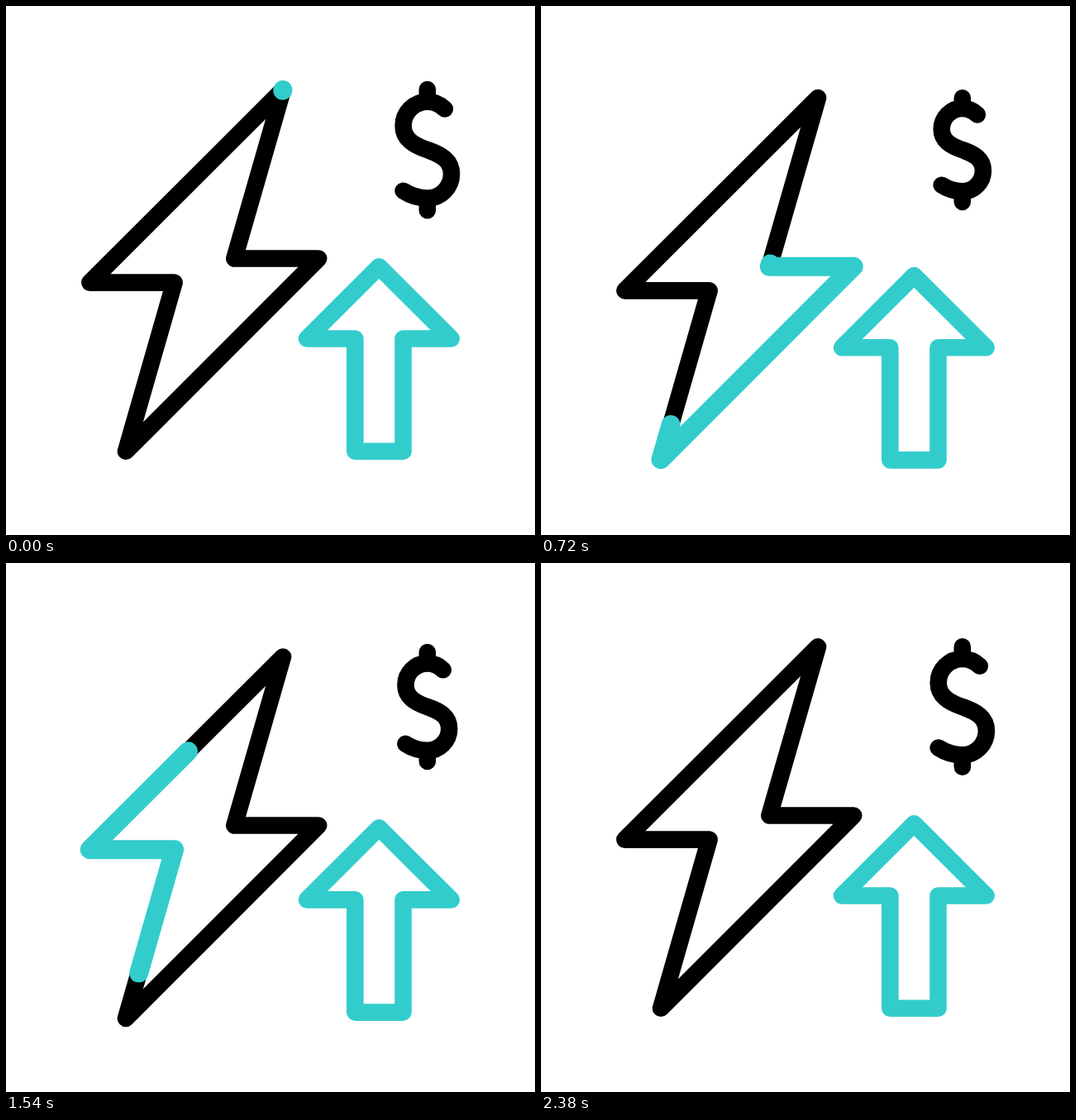
These frames come from a looping animation (640 by 640 pixels, 2400 ms). An HTML page:

```html
<!DOCTYPE html>
<html lang="en">
<head>
<meta charset="utf-8">
<title>Rising energy price</title>
<style>
  html, body { margin: 0; width: 100%; height: 100%; overflow: hidden; background: #fff; }
  svg { display: block; width: 100vw; height: 100vh; }
  path { fill: none; stroke: #000; stroke-width: 20.6; stroke-linecap: round; stroke-linejoin: round; vector-effect: non-scaling-stroke; }
  .teal { stroke: #33cccc; }
  #spark { stroke-width: 23; vector-effect: none; }
</style>
</head>
<body>
<svg viewBox="0 0 640 640">
  <g id="bolt">
    <path d="M335 101.4 276.3 305.5H378.2L145 538.8 203.6 334.6H101.3Z"/>
    <path id="spark" class="teal" pathLength="1" d="M335 101.4 276.3 305.5H378.2L145 538.8 203.6 334.6H101.3L335 101.4"/>
  </g>
  <g id="arrow">
    <path class="teal" d="M451.3 315.4 364 402.5H422.3V538.7H480.5V402.5H538.7Z"/>
  </g>
  <g id="dollar">
    <path d="M21 -49.6C15.5 -55 8 -58.4 0 -58.4C-16.1 -58.4 -29.2 -45.3 -29.2 -29.2C-29.2 -13 -16 -5.5 0 0C17 5.8 29.2 13 29.2 29.2C29.2 45.3 16.1 58.4 0 58.4C-11 58.4 -21.5 54.6 -29.2 49.6M0 -73V-58.4M0 58.4V73"/>
  </g>
</svg>
<script>
const LOOP = 2400, HALF = 1200, QUARTER = 600;
const [bolt, spark, arrow, dollar] = ['bolt', 'spark', 'arrow', 'dollar'].map(id => document.getElementById(id));

// Trim positions along the bolt: [ms, share of the outline]
const HEAD = [[0, 0], [320, .2266], [720, .533], [1080, .71], [1540, .874], [1760, 1]];
const TAIL = [[0, 0], [320, .063], [720, .162], [1080, .235], [1540, .543], [1780, .8256], [2170, 1]];

const slope = (a, b) => (b[1] - a[1]) / (b[0] - a[0]);

// Smooth curve through the steps, held after the last one
function track(steps, t) {
  const last = steps.length - 1;
  if (t >= steps[last][0]) return steps[last][1];
  const i = steps.findIndex(s => s[0] > t) - 1;
  const a = steps[i], b = steps[i + 1], d = b[0] - a[0], u = (t - a[0]) / d;
  const m = slope(a, b);
  const m0 = i ? (m + slope(steps[i - 1], a)) / 2 : m;
  const m1 = i + 1 < last ? (m + slope(b, steps[i + 2])) / 2 : m;
  const v = 1 - u;
  return a[1] * v * v * (1 + 2 * u) + b[1] * u * u * (3 - 2 * u) + d * u * v * (m0 * v - m1 * u);
}

// Rises 0 to 1 and falls back within one period
const wave = (t, period) => 1 - Math.abs(t % period / period * 2 - 1);
const smooth = u => u * u * (3 - 2 * u);
const easeIn = u => .6 * (1 - u) * u * u + u ** 3;

function draw(t) {
  const swing = wave(t, HALF);
  bolt.setAttribute('transform', `translate(0 ${15 * smooth(wave(t, LOOP))})`);
  arrow.setAttribute('transform', `translate(0 ${18.3 * easeIn(swing)})`);

  const shrink = .18 * swing ** (t < QUARTER ? 2.9 : 1.1);
  dollar.setAttribute('transform', `translate(509.8 174.1) scale(${1 - shrink})`);

  const tail = track(TAIL, t), len = track(HEAD, t) - tail;
  spark.style.display = len > .0005 ? '' : 'none';
  spark.style.strokeDasharray = `${Math.max(len, 0)} 2`;
  spark.style.strokeDashoffset = -tail;
}

const start = performance.now();
function tick() {
  draw((performance.now() - start) % LOOP);
  requestAnimationFrame(tick);
}
tick();
</script>
</body>
</html>
```
